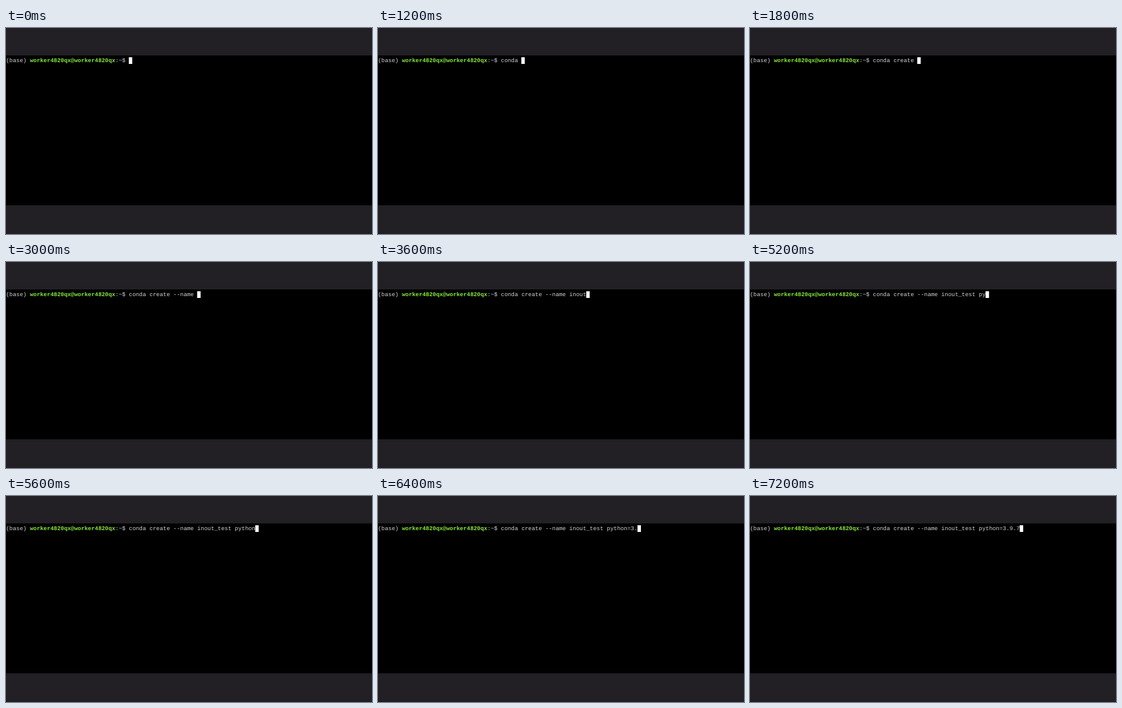
Write an HTML page that moves like this. It is 600 px wide and 338 px high and loops after 8000 ms.

```html
<!DOCTYPE html>
<html lang="en">
<head>
<meta charset="utf-8">
<title>Terminal</title>
<style>
  html, body { margin: 0; width: 100%; height: 100%; overflow: hidden; background: #222025; }
  svg { display: block; width: 100vw; height: 100vh; }
  text {
    font: 9.333px "Liberation Mono", "Courier New", monospace;
    fill: #d0d0d0;
    white-space: pre;
    text-rendering: geometricPrecision;
  }
  .user { fill: #8ae83a; font-weight: bold; }
  .path { fill: #729fcf; font-weight: bold; }
</style>
</head>
<body>
<svg viewBox="0 0 600 338">
  <rect width="600" height="338" fill="#222025"/>
  <rect y="45" width="600" height="246" fill="#000"/>
  <text x="0" y="55.8" xml:space="preserve">(base) <tspan class="user">worker4820qx@worker4820qx</tspan>:<tspan class="path">~</tspan>$ <tspan id="typed"></tspan></text>
  <rect id="cursor" y="48" width="5.6" height="11" fill="#fff"/>
</svg>
<script>
  const LOOP = 8000;
  const TICK = 200;
  const ADVANCE = 5.6;
  const PROMPT_LENGTH = 36;
  const COMMAND = "conda create --name inout_test python=3.9.7";

  // Each burst: start time, then the number of characters typed after each tick.
  const bursts = [
    [800, [2, 4, 6, 8, 10, 13]],
    [2200, [14, 15, 17, 18, 20]],
    [3400, [23, 25]],
    [4000, [26, 28, 30, 31]],
    [5200, [33, 35, 37, 38]],
    [6400, [40, 41, 42]],
    [7200, [43]]
  ];

  const typed = document.getElementById("typed");
  const cursor = document.getElementById("cursor");

  function typedCount(time) {
    let count = 0;
    for (const [start, counts] of bursts) {
      if (time < start) break;
      const step = Math.floor((time - start) / TICK);
      count = counts[Math.min(step, counts.length - 1)];
    }
    return count;
  }

  function render(time) {
    const count = typedCount(time);
    typed.textContent = COMMAND.slice(0, count);
    cursor.setAttribute("x", (PROMPT_LENGTH + count) * ADVANCE - 0.2);
  }

  const origin = performance.now();
  function loop() {
    render((performance.now() - origin) % LOOP);
    requestAnimationFrame(loop);
  }
  loop();
</script>
</body>
</html>
```
